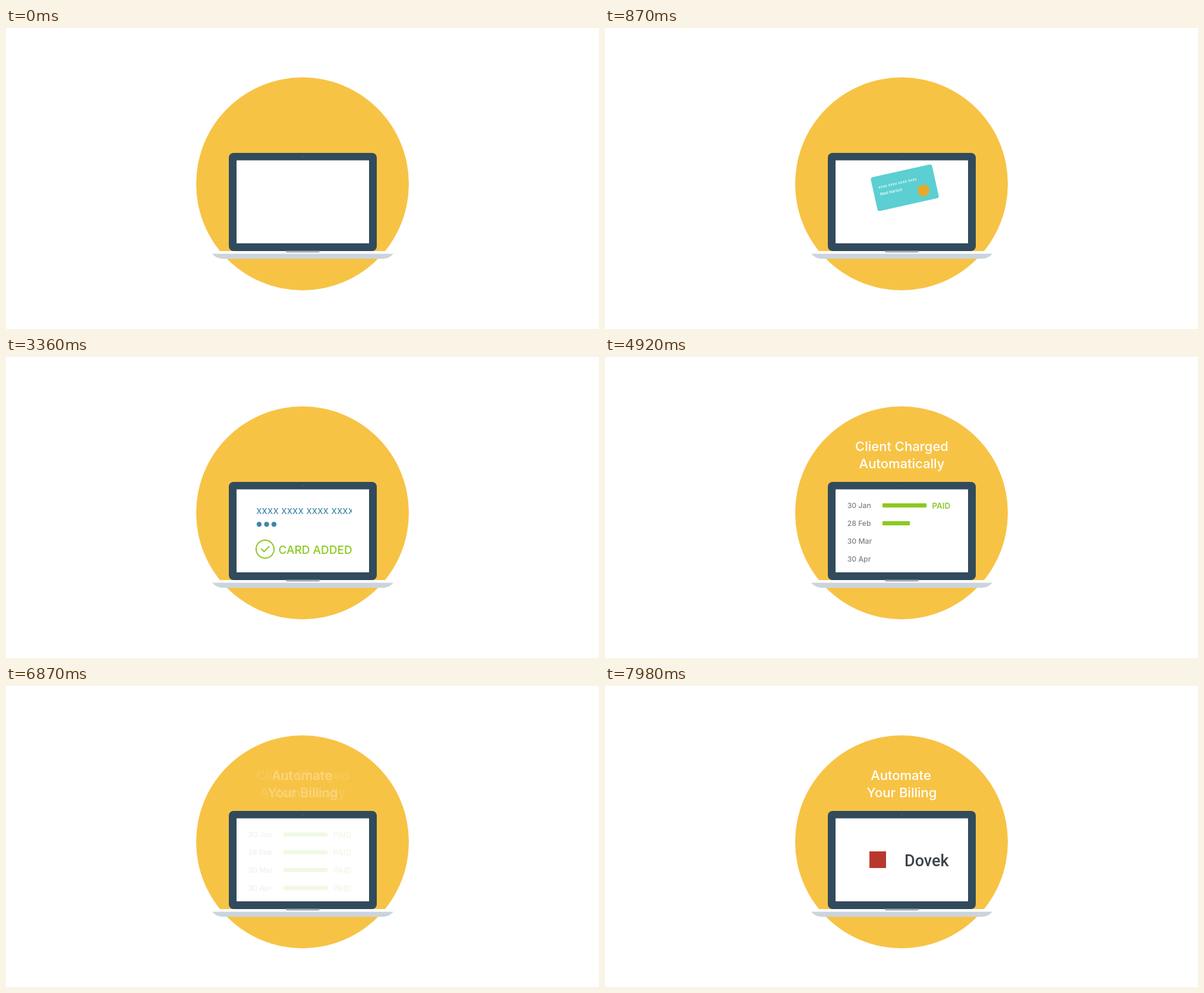
An HTML page with a canvas that plays this animation: 998 by 506 pixels, repeating every 8000 ms.

```html
<!DOCTYPE html>
<html lang="en">
<head>
<meta charset="utf-8">
<title>Automatic billing</title>
<style>
  html, body { margin: 0; width: 100%; height: 100%; overflow: hidden; background: #fff; }
  canvas { display: block; width: 998px; height: 506px; }
</style>
</head>
<body>
<canvas id="stage" width="998" height="506"></canvas>
<script>
const ctx = document.getElementById('stage').getContext('2d');
const LOOP = 8000, STEP = 30;
const YELLOW = '#f7c345', NAVY = '#314b5c', GREEN = '#8cc921', BLUE = '#3f87aa';
const SANS = 'Inter, "Open Sans", sans-serif';

const clamp = v => Math.max(0, Math.min(1, v));
const progress = (t, start, end) => clamp((t - start) / (end - start));
const easeOut = p => 1 - (1 - p) ** 3;
const easeInOut = p => (1 - Math.cos(Math.PI * p)) / 2;
const mix = (a, b, p) => a + (b - a) * p;

function layer(alpha, paint) {
  if (alpha <= 0) return;
  ctx.save();
  ctx.globalAlpha *= alpha;
  paint();
  ctx.restore();
}

function box(x, y, w, h, r, color) {
  ctx.fillStyle = color;
  ctx.beginPath();
  ctx.roundRect(x, y, w, h, r);
  ctx.fill();
}

function disc(x, y, r, color) {
  ctx.fillStyle = color;
  ctx.beginPath();
  ctx.arc(x, y, r, 0, Math.PI * 2);
  ctx.fill();
}

function text(str, x, y, size, color, { weight = 500, align = 'left', family = SANS, spacing = 0 } = {}) {
  ctx.font = `${weight} ${size}px ${family}`;
  ctx.letterSpacing = `${spacing}px`;
  ctx.textAlign = align;
  ctx.fillStyle = color;
  ctx.fillText(str, x, y);
}

// Shows only the part of a painting left of a moving edge.
function wipe(x, y, w, h, p, paint) {
  if (p <= 0) return;
  ctx.save();
  ctx.beginPath();
  ctx.rect(x, y, w * p, h);
  ctx.clip();
  paint();
  ctx.restore();
}

function laptop() {
  box(375, 210, 249, 165, 8, NAVY);
  box(388, 222.5, 223, 139.5, 0, '#fff');
  disc(499.5, 216.5, 0.8, '#5f7686');
  box(347, 375, 305, 5, 0, '#fff');
  ctx.fillStyle = '#cbd4dc';
  ctx.beginPath();
  ctx.moveTo(347, 379.5);
  ctx.lineTo(652, 379.5);
  ctx.quadraticCurveTo(645, 388, 633, 388);
  ctx.lineTo(366, 388);
  ctx.quadraticCurveTo(354, 388, 347, 379.5);
  ctx.fill();
  box(471, 374.5, 57, 3, [0, 0, 2, 2], '#a4aeb9');
}

function card({ x, y, angle }) {
  ctx.save();
  ctx.translate(x, y);
  ctx.rotate(angle * Math.PI / 180);
  box(-52.8, -29, 105.6, 58, 4, '#5bcfd2');
  text('xxxx xxxx xxxx xxxx', -43.3, -8, 6.8, '#fff');
  text('Ned Harlick', -42.8, 4, 6.8, '#fff');
  disc(29.8, 11.3, 10, '#e5aa2c');
  ctx.restore();
}

// Card path on the way into the screen: time, x, y, angle.
const swing = [
  [570, 577, 165, -61],
  [720, 491, 322, 8],
  [870, 504.5, 268.5, -12.6],
  [990, 503.5, 286.5, -6.2]
];

function cardPose(t) {
  if (t <= 570) {
    return { x: 577, y: mix(272, 165, easeOut(progress(t, 0, 360))), angle: -61 };
  }
  const i = Math.max(1, swing.findIndex(k => k[0] >= t));
  const [a, b] = t >= 990 ? [swing[3], swing[3]] : [swing[i - 1], swing[i]];
  const p = a === b ? 1 : easeInOut(progress(t, a[0], b[0]));
  return { x: mix(a[1], b[1], p), y: mix(a[2], b[2], p), angle: mix(a[3], b[3], p) };
}

function cardForm(t) {
  wipe(422, 250, 160, 20, progress(t, 1899, 2099), () =>
    text('XXXX XXXX XXXX XXXX', 421.7, 264, 13.5, BLUE,
      { weight: 600, family: '"Open Sans", "Noto Sans", sans-serif', spacing: 1 }));

  wipe(421, 275, 35, 12, progress(t, 2100, 2400), () =>
    [426, 438.6, 451].forEach(x => disc(x, 281.2, 4.2, BLUE)));

  ctx.strokeStyle = GREEN;
  ctx.lineWidth = 2;
  const turn = progress(t, 2400, 2970);
  if (turn > 0) {
    const start = Math.PI / 3;
    ctx.beginPath();
    ctx.arc(436, 323, 15.1, start, start + turn * Math.PI * 2);
    ctx.stroke();
  }

  wipe(427, 315, 18, 16, progress(t, 2880, 3060), () => {
    ctx.beginPath();
    ctx.moveTo(429.3, 322);
    ctx.lineTo(434.3, 327);
    ctx.lineTo(443.3, 318.3);
    ctx.stroke();
  });

  wipe(458, 312, 128, 26, progress(t, 3030, 3360), () =>
    text('CARD ADDED', 458.5, 331, 19, GREEN));
}

function heading(...lines) {
  lines.forEach((line, i) =>
    text(line, i || lines[0].length > 10 ? 499.5 : 498, 158 + i * 29, 22, '#fff', { align: 'center' }));
}

function payments(t) {
  ['30 Jan', '28 Feb', '30 Mar', '30 Apr'].forEach((date, i) => {
    const y = 246 + i * 30, start = 4279 + i * 455;
    layer(progress(t, 4230, 4500), () => text(date, 407.7, y + 8.2, 12.2, '#7d8084'));
    wipe(467, y, 74, 7, progress(t, start, start + 300), () => box(467, y, 74, 7, 1, GREEN));
    layer(progress(t, start + 300, start + 455), () =>
      text('PAID', 550.5, y + 9, 13.4, '#8cc52f', { weight: 600 }));
  });
}

function brand(p) {
  layer(p, () => {
    ctx.translate(0, 9 * (1 - easeOut(p)));
    box(445, 278, 28, 28, 0, '#b9382e');
    text('Dovek', 504, 303, 27, '#3b424c', { family: 'Roboto, sans-serif' });
  });
}

function draw(t) {
  ctx.fillStyle = '#fff';
  ctx.fillRect(0, 0, 998, 506);
  disc(499, 262, 179, YELLOW);

  if (t > 0 && t < 570) card(cardPose(t));
  laptop();
  if (t >= 570) layer(1 - progress(t, 1260, 1800), () => card(cardPose(t)));

  layer(1 - progress(t, 3810, 3960), () => cardForm(t));

  layer(1 - progress(t, 6645, 6900), () => {
    payments(t);
    layer(progress(t, 4230, 4500), () => heading('Client Charged', 'Automatically'));
  });

  layer(progress(t, 6630, 7470), () => heading('Automate', 'Your Billing'));
  brand(progress(t, 7440, 7980));
}

function frame(now) {
  const t = now % LOOP;
  draw(Math.floor(t / STEP) * STEP);
  requestAnimationFrame(frame);
}

draw(0);
requestAnimationFrame(frame);
</script>
</body>
</html>
```
